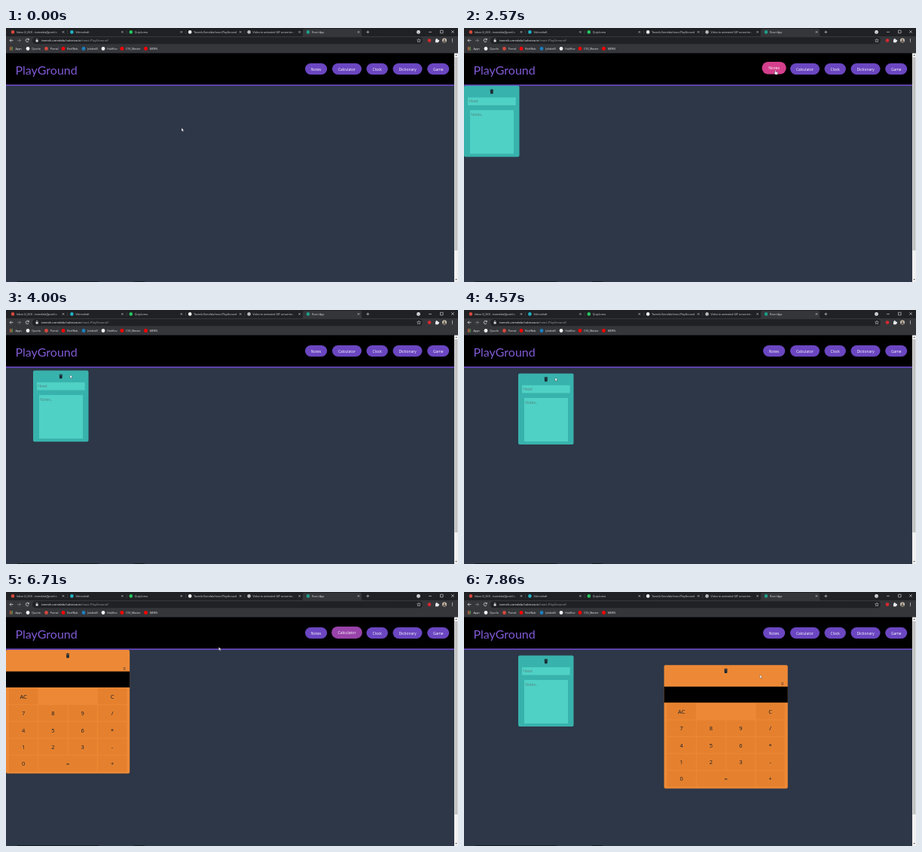
An HTML page for the animation above (8000 ms loop, 600 by 338 pixels).

```html
<!DOCTYPE html>
<html lang="en">
<head>
<meta charset="utf-8">
<title>PlayGround</title>
<style>
  html, body { margin: 0; width: 100%; height: 100%; overflow: hidden; background: #2d3748; }
  svg { display: block; width: 100%; height: 100%; font-family: "Open Sans", "Noto Sans", sans-serif; }
</style>
</head>
<body>
<svg id="stage" viewBox="0 0 600 338"></svg>
<script>
const stage = document.getElementById('stage');

// Markup helpers
const rect = (x, y, w, h, fill, r = 0) =>
  `<rect x="${x}" y="${y}" width="${w}" height="${h}" rx="${r}" fill="${fill}"/>`;
const dot = (x, y, r, fill) => `<circle cx="${x}" cy="${y}" r="${r}" fill="${fill}"/>`;
const line = (d, color = '#dfe1e5', width = 0.6) =>
  `<path d="${d}" fill="none" stroke="${color}" stroke-width="${width}"/>`;
const text = (x, y, label, size, fill, anchor = 'start') =>
  `<text x="${x}" y="${y}" font-size="${size}" fill="${fill}" text-anchor="${anchor}">${label}</text>`;
const cross = (x, y, r) =>
  line(`M${x - r} ${y - r}l${2 * r} ${2 * r}m0 ${-2 * r}l${-2 * r} ${2 * r}`);
const trash = (x, y) =>
  `<path transform="translate(${x} ${y})" d="M-2.4 -2.6H-.9V-3.2H.9V-2.6H2.4V-1.8H-2.4ZM-2 -1.4H2L1.7 3H-1.7Z" fill="#1a2a35"/>`;

function tabStrip() {
  const tabs = [
    ['Inbox (2,263) - tvomdala@postil.c', '#d5493d'],
    ['Velmodraft', '#20b2c4'],
    ['QuipLoma', '#25c560'],
    ['Tarenik-Vomdala/react-PlayGround', '#f1f1f1'],
    ['Video to animated GIF converter -', '#b9b9b9'],
    ['React App', '#1f9c86']
  ];
  let out = rect(0, 0, 600, 11, '#202124') +
    `<path d="M392 11q2 0 2 -2V3q0 -2 2 -2h74q2 0 2 2v6q0 2 2 2Z" fill="#35363a"/>`;
  tabs.forEach(([label, color], i) => {
    const x = 78.4 * i;
    out += dot(x + 9, 5.4, 2.3, color) + text(x + 14, 6.7, label, 3.5, '#d5d7da') + cross(x + 76, 5.4, 1.2);
    if (i < 4) out += rect(x + 81.5, 3, 0.4, 5, '#5a5c60');
  });
  return out + line('M478.3 5.4h4m-2 -2v4') +
    dot(547.5, 5.4, 2.4, '#e8eaed') + line('M546.4 5l1.1 1.1l1.1 -1.1', '#202124') +
    line('M561 5.4h4') + line('M576.5 3.2h3.6v3.6h-3.6z') + cross(593, 5, 1.8);
}

function toolbar() {
  return rect(0, 11, 600, 22.5, '#35363a') + rect(35, 12.2, 518, 9, '#202124', 4.5) +
    line('M9.5 16.6h-4.5m2 -2l-2 2l2 2', '#e8eaed', 0.7) +
    line('M15 16.6h4.5m-2 -2l2 2l-2 2', '#8b8d91', 0.7) +
    line('M30 15.2a2.1 2.1 0 1 0 .2 2.2M30.3 14v1.8h-1.8', '#e8eaed', 0.7) +
    rect(39.6, 16, 3, 2.6, '#dfe1e5', 0.3) + line('M40.2 16v-.8a.9 .9 0 0 1 1.8 0v.8') +
    `<text x="47" y="18.3" font-size="4.1" fill="#f1f3f4">tarenik-vomdala.hubrova.io<tspan fill="#9aa0a6">/react-PlayGround/</tspan></text>` +
    line('M548 14.2l.7 1.6l1.7 .1l-1.3 1.2l.4 1.7l-1.5 -.9l-1.5 .9l.4 -1.7l-1.3 -1.2l1.7 -.1z', '#dfe1e5', 0.5) +
    dot(562, 16.6, 2.3, '#d8282f') +
    rect(570, 15.2, 4, 4, '#e8eaed', 0.5) + dot(571.7, 14.9, 1, '#e8eaed') + dot(574.2, 17, 1, '#e8eaed') +
    dot(582, 16.6, 3, '#c8bfae') + dot(582, 15.8, 1, '#584d45') +
    `<path d="M580 18.8a2 2 0 0 1 4 0z" fill="#584d45"/>` +
    [14.9, 16.6, 18.3].map(y => dot(592.5, y, 0.55, '#e8eaed')).join('');
}

function bookmarks() {
  const items = [
    [29, 'Quorla', '#f1f1f1'], [53.5, 'Pomal', '#d5493d'], [76, 'ReelNob', '#f00'],
    [103, 'JobbinEl', '#1c7fc0'], [129, 'HubRov', '#f1f1f1'],
    [154, 'CSS_Master', '#f00'], [185.5, 'MERN', '#f00']
  ];
  let out = text(12.5, 28.9, 'Apps', 3.6, '#e8eaed');
  const colors = ['#e9594d', '#f0b72f', '#4c9e5b'];
  for (let i = 0; i < 9; i++)
    out += rect(4.8 + i % 3 * 1.6, 25.2 + Math.floor(i / 3) * 1.6, 1.1, 1.1, colors[i % 3]);
  for (const [x, label, color] of items)
    out += dot(x, 27.5, 2.4, color) + text(x + 5.3, 28.9, label, 3.6, '#e8eaed');
  return out;
}

function pageFrame() {
  return rect(0, 33.5, 600, 42, '#000') + rect(0, 75.4, 596, 1.6, '#6b46c1') +
    `<text x="12.5" y="61.5" font-size="16" fill="#805ad5" font-family="'Comic Sans MS', Lato, sans-serif">PlayGround</text>` +
    rect(15, 337, 108, 1, '#171b22') + rect(170, 337, 14, 1, '#171b22') +
    rect(595, 33.5, 5, 304.5, '#f1f1f1') + rect(595.5, 39, 4, 257, '#c1c1c1') +
    '<path d="M596.3 37l1.3 -1.5l1.3 1.5zM596.3 334l1.3 1.5l1.3 -1.5z" fill="#505050"/>';
}

const navItems = [
  ['Notes', 397, 29.2], ['Calculator', 433, 39], ['Clock', 478.5, 28.4],
  ['Dictionary', 513.5, 39], ['Game', 559.2, 29]
];
const navButton = ([label, x, w]) =>
  `<g id="nav${label}">${rect(x, 46.9, w, 15.2, '#6b46c1', 7.6)}${text(x + w / 2, 56.5, label, 4.9, '#fff', 'middle')}</g>`;

function notePanel() {
  return rect(0, 0, 73.5, 94.7, '#38b2ac', 2) + trash(36.8, 7.8) +
    rect(5, 15.7, 63.7, 10.4, '#4fd1c5') + text(6.3, 22.8, 'Head', 5, '#55827f') +
    rect(8, 32.6, 58, 58, '#4fd1c5') + text(9.2, 40.3, 'Notes..', 5, '#55827f');
}

function calculatorPanel() {
  let out = rect(0, 0, 164.2, 164.4, '#ed8936', 2) + trash(82, 7.8) +
    text(158.5, 27, '0', 5, '#1a202c', 'end') + rect(0, 28.7, 164.2, 21.3, '#000');
  const key = (label, col, row, span = 1) => {
    const x = 4 + col * 39.3, y = 51 + row * 22.4, w = 39.3 * span - 1;
    out += rect(x, y, w, 21.4, '#e5812e') + text(x + w / 2, y + 13.7, label, 7.5, '#1a202c', 'middle');
  };
  key('AC', 0, 0);
  key('C', 3, 0);
  ['789/', '456*', '123-'].forEach((keys, r) => [...keys].forEach((k, c) => key(k, c, r + 1)));
  key('0', 0, 4);
  key('=', 1, 4, 2);
  key('+', 3, 4);
  return out;
}

const arrow = '<path id="arrow" d="M0 0V4.6L1.1 3.6L1.9 5.2L2.6 4.9L1.9 3.3H3.3Z" fill="#fff" stroke="#111" stroke-width=".25"/>';
const hand = '<path id="hand" d="M-.6 .3Q0 -.4 .5 .3V2.2L2.8 2.8Q3.3 3 3.2 3.8L2.7 6H-.1L-1.7 3.7Q-1.6 2.8 -.6 3.5Z" fill="#fff" stroke="#111" stroke-width=".3"/>';

stage.innerHTML = tabStrip() + toolbar() + bookmarks() + pageFrame() +
  navItems.map(navButton).join('') +
  `<g id="note">${notePanel()}</g><g id="calculator">${calculatorPanel()}</g>` +
  `<g id="cursor">${arrow}${hand}</g>`;

// Motion: [time, x, y]
const cursorPath = [
  [0, 233, 133], [430, 234, 140], [1140, 392, 73], [1430, 413, 56], [2570, 414, 56],
  [3430, 49, 82.5], [3570, 49, 82.5], [4430, 121, 90], [4710, 121, 90], [4860, 142, 100],
  [5570, 446, 59], [5860, 451, 55], [6280, 451, 55], [6840, 127, 90], [6900, 127, 90],
  [7000, 180, 126], [7140, 275, 155], [7430, 345, 136], [7860, 393, 110]
];
const notePath = [[3570, 0, 76.7], [4430, 72, 84.4]];
const calculatorPath = [[6900, 0, 77], [7000, 38, 106], [7140, 102, 141], [7430, 200, 125], [7860, 266, 97]];

const byId = id => document.getElementById(id);
const clamp = v => Math.min(1, Math.max(0, v));
const smooth = v => { v = clamp(v); return v * v * (3 - 2 * v); };

function along(path, t) {
  let i = 0;
  while (i < path.length - 2 && t >= path[i + 1][0]) i++;
  const [t0, x0, y0] = path[i], [t1, x1, y1] = path[i + 1];
  const p = clamp((t - t0) / (t1 - t0));
  return [x0 + (x1 - x0) * p, y0 + (y1 - y0) * p];
}
const place = (id, [x, y]) => byId(id).setAttribute('transform', `translate(${x} ${y})`);
const show = (id, on) => byId(id).setAttribute('visibility', on ? 'visible' : 'hidden');

function hover(index, enter, leave, t) {
  const [label, x, w] = navItems[index];
  const p = smooth((t - enter) / 500) - smooth((t - leave) / 500);
  const cx = x + w / 2, cy = 54.5, scale = 1 + 0.1 * p;
  const button = byId('nav' + label);
  button.setAttribute('transform',
    `translate(${cx} ${cy - 1.25 * p}) scale(${scale}) translate(${-cx} ${-cy})`);
  const mix = (a, b) => Math.round(a + (b - a) * p);
  button.firstChild.setAttribute('fill', `rgb(${mix(107, 213)},${mix(70, 63)},${mix(193, 140)})`);
}

const STEP = 1000 / 7;
function draw(now) {
  const t = Math.floor((now % 8000 + 3) / STEP) % 56 * STEP;
  const pointing = (t > 1350 && t < 2600) || (t > 5550 && t < 6300);
  place('cursor', along(cursorPath, t));
  show('hand', pointing);
  show('arrow', !pointing);
  place('note', along(notePath, t));
  show('note', t > 2500);
  place('calculator', along(calculatorPath, t));
  show('calculator', t > 6100);
  hover(0, 1380, 2600, t);
  hover(1, 5570, 6300, t);
}

const start = performance.now();
function tick() {
  draw(performance.now() - start);
  requestAnimationFrame(tick);
}
tick();
</script>
</body>
</html>
```
